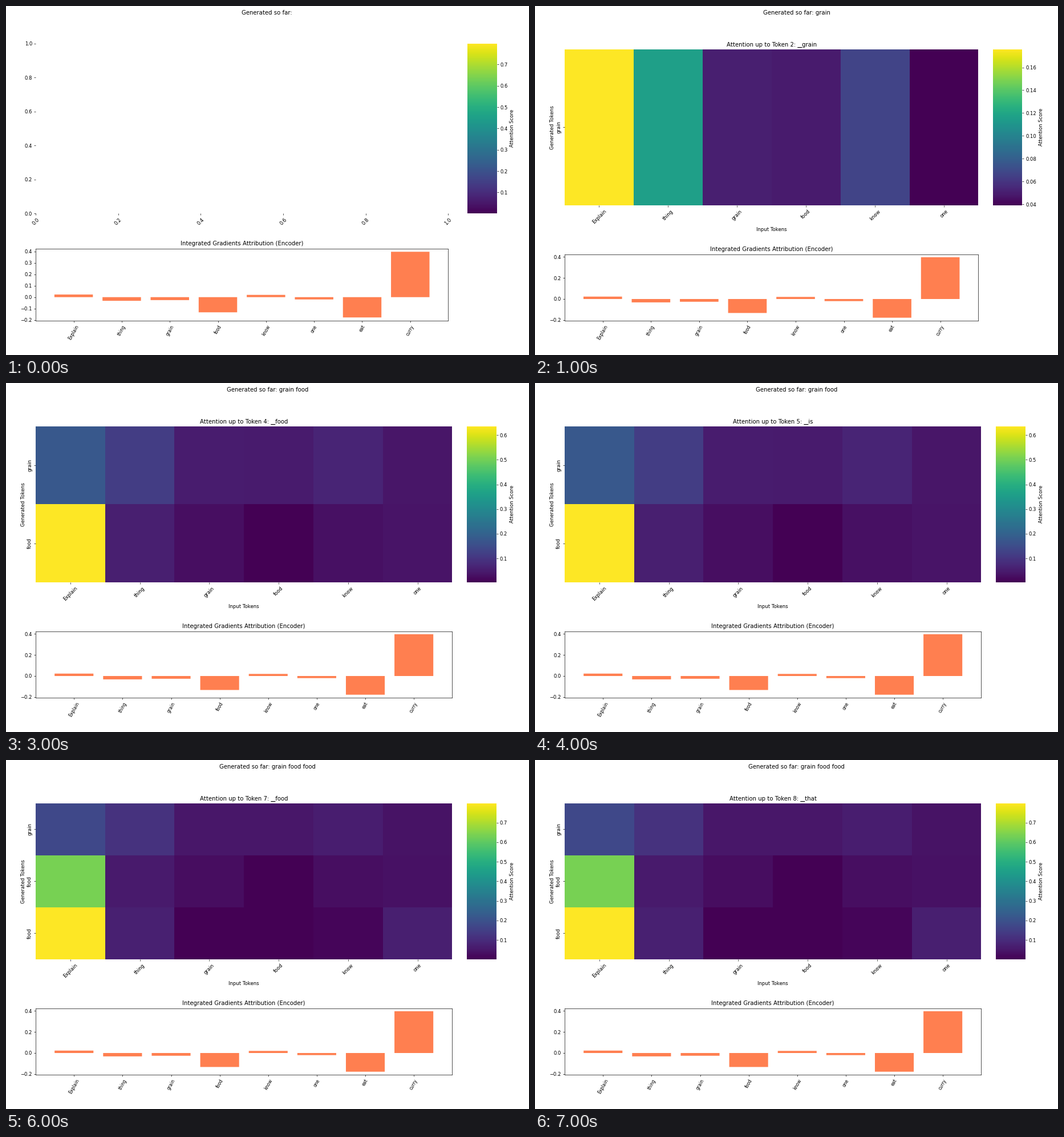
Recreate the animation shown at these times as a matplotlib script. Size 917 by 611 pixels, loop 8 s.

```python
import numpy as np
import matplotlib.pyplot as plt
from matplotlib.animation import FuncAnimation
from matplotlib.cm import ScalarMappable
from matplotlib.colors import Normalize

W, H, DPI = 917, 611, 61.1
LEFT, BOTTOM = 52, 551

plt.rcParams["font.family"] = "DejaVu Sans"

INPUTS = ["Explain", "thing", "grain", "food", "know", "one", "eat", "curry"]
GRADIENTS = [0.023, -0.032, -0.026, -0.133, 0.020, -0.020, -0.178, 0.398]

# Attention of each kept output token over the first six inputs
ATTENTION = np.array([
    [0.1758, 0.1157, 0.0508, 0.0490, 0.0665, 0.0392],
    [0.6350, 0.0572, 0.0270, 0.0035, 0.0300, 0.0370],
    [0.7985, 0.0730, 0.0030, 0.0015, 0.0110, 0.0680],
])
KEPT = ["grain", "food", "food"]

# Generated token and the number of kept tokens so far
STEPS = [
    (None, 0),
    ("\u2581grain", 1),
    ("y", 1),
    ("\u2581food", 2),
    ("\u2581is", 2),
    ("\u2581the", 2),
    ("\u2581food", 3),
    ("\u2581that", 3),
]

# Per row count: right edge of the plots, colorbar left edge, colorbar ticks
LAYOUT = {
    0: (775.4, 808.8, np.arange(1, 8) / 10),
    1: (777.4, 802.6, np.arange(4, 17, 2) / 100),
    2: (782.4, 808.2, np.arange(1, 7) / 10),
    3: (782.4, 808.2, np.arange(1, 8) / 10),
}
BAR_W = 51.8

fig = plt.figure(figsize=((W + 1e-3) / DPI, (H + 1e-3) / DPI), dpi=DPI)


def add_axes(x0, top, x1, bottom):
    """Axes placed by pixel edges measured from the top left corner."""
    return fig.add_axes([x0 / W, 1 - bottom / H, (x1 - x0) / W, (bottom - top) / H])


def draw_heatmap(ax, rows, token, step):
    ax.pcolormesh(ATTENTION[:rows], cmap="viridis")
    ax.set_xlim(0, 6)
    ax.set_ylim(rows, 0)
    ax.set_xticks(np.arange(6) + 0.5, INPUTS[:6])
    ax.set_yticks(np.arange(rows) + 0.5, KEPT[:rows], rotation=90, va="center")
    ax.set_xlabel("Input Tokens")
    ax.set_ylabel("Generated Tokens", labelpad=3)
    ax.set_title(f"Attention up to Token {step + 1}: {token}")


def draw_colorbar(cax, rows, ticks):
    values = ATTENTION[:rows or 3]
    norm = Normalize(values.min(), values.max())
    bar = fig.colorbar(ScalarMappable(norm, "viridis"), cax=cax, ticks=ticks)
    bar.outline.set_visible(False)
    bar.set_label("Attention Score")


def draw_gradients(ax, tick_step):
    ax.bar(range(len(INPUTS)), GRADIENTS, color="coral", snap=False)
    ax.set_xticks(range(len(INPUTS)), INPUTS, rotation=60, fontsize=9)
    ax.set_yticks(np.round(np.arange(-0.2, 0.41, tick_step), 1))
    ax.set_title("Integrated Gradients Attribution (Encoder)")


def draw(step):
    fig.clear()
    token, rows = STEPS[step]
    right, bar_left, ticks = LAYOUT[rows]
    top, bottom = (76, 348.8) if rows else (65.6, 363.2)

    ax = add_axes(LEFT, top, right, bottom)
    ax.spines[:].set_visible(False)
    if rows:
        draw_heatmap(ax, rows, token, step)
    ax.tick_params(axis="x", labelrotation=45)

    draw_colorbar(add_axes(bar_left, top, bar_left + BAR_W, bottom), rows, ticks)
    draw_gradients(add_axes(LEFT, 434.53 if rows else 424.53, right, BOTTOM),
                   0.2 if rows else 0.1)

    fig.text(0.5, 1 - 14.9 / H, "Generated so far: " + " ".join(KEPT[:rows]),
             ha="center", va="baseline", fontsize=12)
    return []


anim = FuncAnimation(fig, draw, frames=len(STEPS), interval=1000, repeat=True)
plt.show()
```
